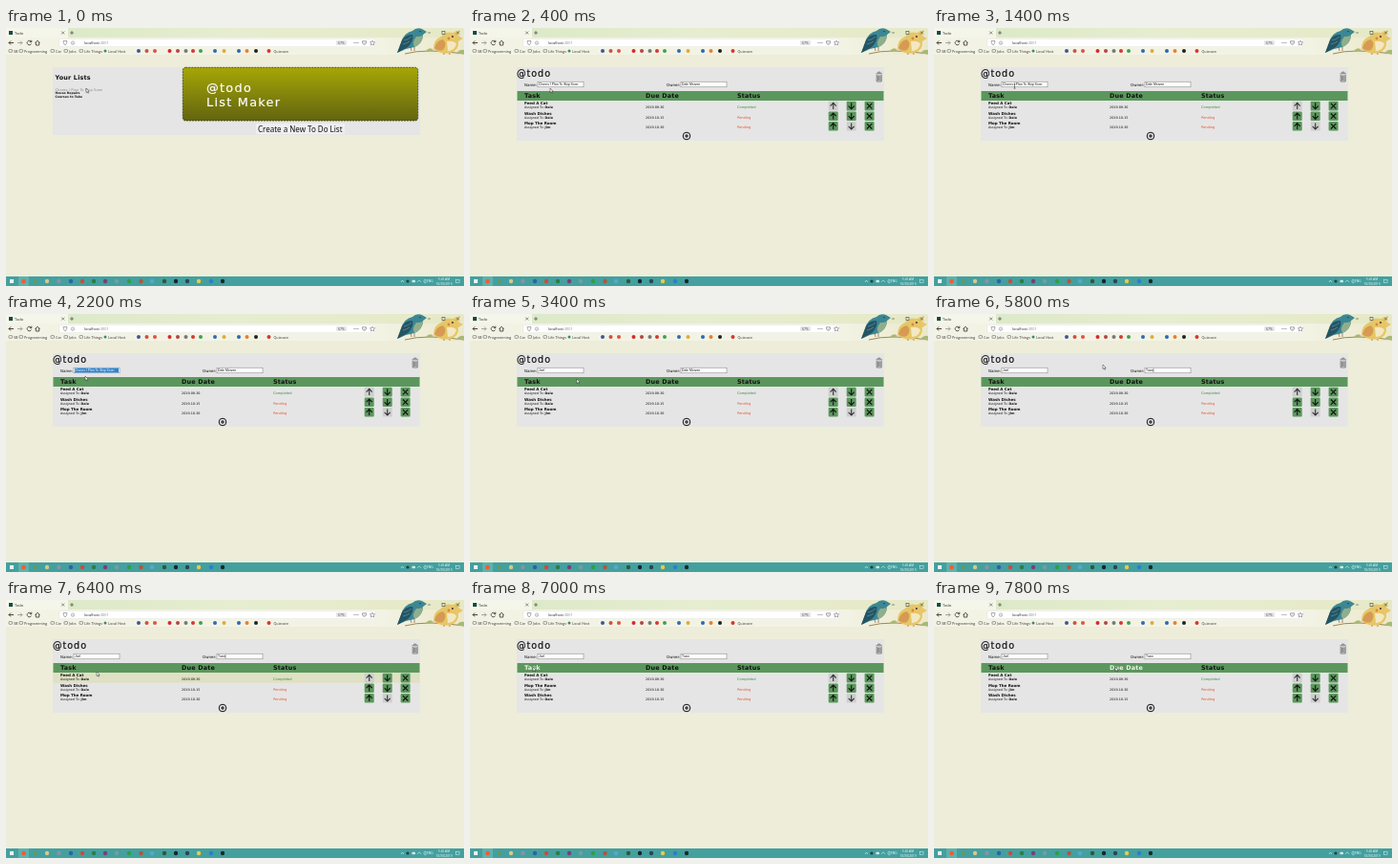
An HTML page for the animation above (8000 ms loop, 480 by 270 pixels).

```html
<!DOCTYPE html>
<html lang="en">
<head>
<meta charset="utf-8">
<title>Todo</title>
<style>
  html, body { margin: 0; width: 100%; height: 100%; overflow: hidden; background: #ededda; }
  svg { display: block; width: 100%; height: 100%; }
  text { font-family: "DejaVu Sans", sans-serif; white-space: pre; }
  .ui { font-family: "Open Sans", sans-serif; }
  .field { font-family: "Liberation Sans", sans-serif; }
  .bold { font-weight: 700; }
  .logo { letter-spacing: .1em; stroke: currentColor; stroke-width: .2; }
</style>
</head>
<body>
<svg id="stage" viewBox="0 0 480 270" preserveAspectRatio="none"></svg>
<script>
const LOOP = 8000, STEP = 200;
const GREEN = '#5b975d', INK = '#111';
const LIST_NAME = 'Chores I Plan To Skip Soon';
const OWNER = 'Dale Morven';
const NEW_NAME = 'Joel', NEW_OWNER = 'Tuan';
const ROW_TOP = 76, ROW_STEP = 10.6;

const tasks = [
  { title: 'Feed A Cat', who: 'Dale', due: '2019-09-30', status: 'Completed' },
  { title: 'Wash Dishes', who: 'Dale', due: '2019-10-15', status: 'Pending' },
  { title: 'Mop The Room', who: 'Jim', due: '2019-10-30', status: 'Pending' },
];

const text = (x, y, size, str, fill = INK, cls = '', extra = '') =>
  `<text x="${x}" y="${y}" font-size="${size}" fill="${fill}" class="${cls}" ${extra}>${str}</text>`;
const rect = (x, y, w, h, fill, extra = '') =>
  `<rect x="${x}" y="${y}" width="${w}" height="${h}" fill="${fill}" ${extra}/>`;
const dot = (x, y, r, fill, extra = '') =>
  `<circle cx="${x}" cy="${y}" r="${r}" fill="${fill}" ${extra}/>`;
const line = (d, width = .8, color = '#333', extra = '') =>
  `<path d="${d}" fill="none" stroke="${color}" stroke-width="${width}" ${extra}/>`;
const shape = (d, fill, extra = '') => `<path d="${d}" fill="${fill}" ${extra}/>`;

function birds() {
  return line('M418 27Q440 21 480 27', 1, '#9a8a5c')
    + shape('M440 24q4-5 8-1q-3 3-8 1M472 27q3-5 8-4v4z', '#a9b878')
    // teal bird, tail at lower left
    + shape('M410 26L414 15Q417 5 426 3Q430-1 436 1L441 4L437 7Q437 16 428 20L419 22Z', '#3c8794')
    + shape('M410 26L415 13Q419 6 426 7Q428 13 421 20Z', '#255463')
    + shape('M430 9Q436 9 437 7Q437 16 428 20Q425 15 430 9Z', '#8fae8c')
    + line('M417 13Q422 12 425 9M416 17Q420 16 423 14', .5, '#7fb0b3')
    + dot(434, 3.6, .7, '#16272b')
    + line('M424 20l1 4M428 20v4', .6, '#6c4630')
    // yellow bird, head at upper right
    + shape('M448 22Q448 12 456 9Q460 3 468 5L476 2L474 8L479 11L474 14Q475 23 466 26Q456 28 448 22Z', '#e6c668')
    + shape('M449 21Q451 13 458 12Q463 17 458 23Q453 25 449 21Z', '#d69a52')
    + shape('M462 14Q470 13 472 17Q470 24 463 24Z', '#f3e8c0')
    + dot(468, 9, .9, '#2b2a20') + dot(464, 11, 1.4, '#dc8943')
    + line('M459 26v2M465 26v2', .6, '#875637');
}

function browser() {
  let out = rect(0, 0, 480, 10, 'url(#strip)')
    + rect(0, 0, 65, 10, '#f5f6ea')
    + rect(3, 3, 4, 4, '#174b45')
    + text(9, 6.5, 4, 'Todo', '#333', 'ui')
    + line('M58.2 3.5l3 3m0-3l-3 3', .6, '#444')
    + line('M69 3v4m-2-2h4', .6)
    + rect(0, 10, 480, 18, '#f3f3e5')
    + rect(390, 10, 90, 18, 'url(#glow)')
    + birds()
    + rect(56, 11.5, 331, 8, '#fff', 'rx="1" stroke="#ddd" stroke-width=".4"')
    + line('M442 5h3M472 3.5l3 3m0-3l-3 3', .6, '#444')
    + rect(457, 3.5, 3, 3, 'none', 'stroke="#444" stroke-width=".6"')
    + line('M8 15.5H3m2-2l-2 2 2 2', .9)
    + line('M12 15.5h5m-2-2l2 2-2 2', .9, '#999')
    + line('M26.5 14.5a2.3 2.3 0 1 0 0 2M26.8 12.7v2h-2', .8)
    + line('M30.5 15.5l2.5-2.3 2.5 2.3M31.3 15v3h3.4v-3', .8)
    + line('M60 13.5h4q0 3-2 4.5q-2-1.5-2-4.5z', .6, '#777')
    + dot(70, 15.6, 1.7, 'none', 'stroke="#777" stroke-width=".5"')
    + line('M70 15.3v1.3', .5, '#777')
    + text(82, 17, 3.8, 'localhost<tspan fill="#888">:3001</tspan>', '#222', 'ui')
    + rect(346, 13, 11, 5, '#e6e6e6', 'rx="1"')
    + text(348, 16.9, 3.4, '67%', '#444', 'ui')
    + [365, 367, 369].map(x => dot(x, 15.5, .5, '#555')).join('')
    + line('M373.5 13.7h4v2q-2 3.5-4 0zM374.4 15l1.1 1 1.1-1', .5, '#555')
    + line('M384 13l.8 1.7 1.8.2-1.3 1.2.4 1.8-1.7-.9-1.7.9.4-1.8-1.3-1.2 1.8-.2z', .5, '#555');

  const folders = [[3, 'SB'], [14, 'Programming'], [47, 'Car'], [61, 'Jobs'], [77, 'Life Things']];
  for (const [x, name] of folders) {
    out += rect(x, 22.6, 3.5, 2.7, 'none', 'rx=".4" stroke="#666" stroke-width=".6"')
      + text(x + 5, 25.5, 3.8, name, '#333', 'ui');
  }
  out += dot(104, 24, 1.5, '#3a8b68') + text(107, 25.5, 3.8, 'Local Host', '#333', 'ui');
  const marks = [[139, '#3b5998'], [147.5, '#d54a3f'], [156, '#e0533a'], [171.5, '#d32929'], [180, '#b8443c'],
    [188.5, '#777'], [196, '#d8382e'], [204, '#3fa053'], [219, '#2f6bb0'], [228.5, '#d8ae35'],
    [244, '#2a6aa8'], [252.5, '#e87e2a'], [262, '#222'], [275.5, '#d9342b']];
  out += marks.map(([x, c]) => dot(x, 24, 2, c)).join('')
    + text(280.5, 25.5, 3.7, 'Quizcave', '#333', 'ui');
  return out;
}

function taskbar() {
  const icons = [[18.5, '#e8602f'], [31, '#5b9c6c'], [43, '#d8c98a'], [55.5, '#8d90a8'], [68, '#2f62a8'],
    [80, '#cf4b34'], [92, '#2f7a4c'], [104, '#7c3c7e'], [116, '#7d9a9c'], [129, '#2aa04a'],
    [141.5, '#b5553d'], [153, '#5aa6d0'], [166, '#2c5a3c'], [178, '#17262b'], [190, '#2a4656'],
    [202, '#ecc94a'], [215, '#2a7fce'], [227, '#20272b']];
  return rect(0, 260, 480, 10, '#43a09f')
    + rect(4, 263, 4, 4, '#e8f4f2')
    + rect(13, 260, 11, 10, '#5fb0ae')
    + icons.map(([x, c]) => dot(x, 265, 2.2, c)).join('')
    + line('M414 266l1.5-2 1.5 2', .6, '#e6f2f1')
    + dot(421, 265, 1.6, '#263c42')
    + rect(425.5, 263.8, 3.4, 2.4, '#d4e8e6')
    + line('M431 266q2-4 4 0M438 264v2l2 1v-4l-2 1', .5, '#e6f2f1')
    + text(441, 266.3, 3.2, 'ENG', '#fff', 'ui')
    + text(459, 264.2, 3.2, '5:26 AM', '#fff', 'ui', 'text-anchor="middle"')
    + text(459, 268.5, 3.2, '10/30/2019', '#fff', 'ui', 'text-anchor="middle"')
    + rect(471.5, 263.6, 3.6, 2.8, 'none', 'stroke="#e6f2f1" stroke-width=".5"');
}

function home() {
  return rect(49, 41, 385, 71, '#e5e5e5')
    + text(51.5, 54.3, 6.4, 'Your Lists', INK, 'bold', 'letter-spacing=".2"')
    + text(51.5, 65.6, 3.6, LIST_NAME, '#888', '', 'letter-spacing=".1"')
    + text(51.5, 69.2, 3.2, 'House Repairs', INK, 'bold')
    + text(51.5, 73, 3.2, 'Courses to Take', INK, 'bold')
    + rect(185.3, 41.3, 246.4, 55.7, 'url(#olive)', 'rx="3" stroke="#353b12" stroke-width=".8" stroke-dasharray="2 1"')
    + text(210, 67, 12.8, '@todo', '#fff', 'logo', 'color="#fff"')
    + text(210, 82, 12.8, 'List Maker', '#fff', 'logo', 'color="#fff"')
    + rect(262, 100, 93, 11, '#efefef')
    + text(264, 108.6, 8, 'Create a New To Do List', INK, '', 'style="font-family:\'Noto Sans\',sans-serif"');
}

function input(x, id) {
  return rect(x, 56.2, 48, 5.6, '#fff', 'stroke="#777" stroke-width=".5"')
    + rect(x + 1, 56.7, 0, 4.6, '#2684d8', `id="${id}Sel"`)
    + text(x + 1, 60.3, 3.4, '', INK, 'field', `id="${id}"`)
    + rect(x, 57, .4, 4, INK, `id="${id}Caret"`);
}

function button(x, y, icon, enabled) {
  const icons = {
    up: 'M0 3.3V-3M-3 0L0-3.2L3 0',
    down: 'M0-3.3V3M-3 0L0 3.2L3 0',
    close: 'M-2.7-2.7L2.7 2.7M2.7-2.7L-2.7 2.7',
  };
  return rect(x - 5, y - 4.8, 10, 9.6, enabled ? GREEN : '#cecece', 'rx="1"')
    + line(icons[icon], 1.1, enabled ? INK : '#333', `transform="translate(${x} ${y})"`);
}

function taskRow(task) {
  const color = task.status === 'Completed' ? '#3d8b4b' : '#f0502e';
  return `<g class="task">`
    + text(57, 4.3, 4, task.title, INK, 'bold')
    + text(57, 8.2, 3.3, `Assigned To: <tspan font-weight="700">${task.who}</tspan>`)
    + text(184, 8.2, 3.35, task.due)
    + text(280, 8.2, 3.6, task.status, color)
    + '</g>';
}

function editor() {
  const buttons = tasks.map((_, i) => {
    const y = 81.6 + i * ROW_STEP;
    return button(380.7, y, 'up', i > 0) + button(399.7, y, 'down', i < 2) + button(418.6, y, 'close', true);
  }).join('');
  return rect(49, 41, 385, 77, '#e5e5e5')
    + text(49, 51, 9.6, '@todo', INK, 'logo', 'color="#111"')
    + line('M425.5 47.8h6.5M427.5 47.2v-1h2.5v1M426.2 49v7h5v-7M427.6 49.5v5.5M428.8 49.5v5.5M430 49.5v5.5', .7, '#555')
    + text(57, 60.6, 4, 'Name:') + input(71, 'name')
    + text(206, 60.6, 4, 'Owner:') + input(221, 'owner')
    + rect(49.5, 66, 384, 10, GREEN)
    + text(57, 73, 6.4, 'Task', INK, 'bold', 'id="taskHead" letter-spacing=".2"')
    + text(184, 73, 6.4, 'Due Date', INK, 'bold', 'id="dueHead" letter-spacing=".2"')
    + text(280, 73, 6.4, 'Status', INK, 'bold', 'letter-spacing=".2"')
    + rect(49.5, 76, 384, ROW_STEP, '#dfe0c4', 'id="hover"')
    + tasks.map(taskRow).join('') + buttons
    + dot(227, 113, 3.8, 'none', 'stroke="#111" stroke-width="1"')
    + line('M227 111v4m-2-2h4', 1, INK);
}

const stage = document.getElementById('stage');
stage.innerHTML = `<defs>
  <linearGradient id="olive" x2="0" y2="1"><stop stop-color="#a6a606"/><stop offset="1" stop-color="#626410"/></linearGradient>
  <linearGradient id="strip"><stop stop-color="#d9e8c6"/><stop offset=".5" stop-color="#e6edd0"/><stop offset="1" stop-color="#e6e9c6"/></linearGradient>
  <linearGradient id="glow"><stop stop-color="#f3f3e5"/><stop offset="1" stop-color="#ebe8c8"/></linearGradient>
  </defs>`
  + rect(0, 0, 480, 270, '#ededda') + browser()
  + `<g id="home">${home()}</g><g id="editor">${editor()}</g>` + taskbar()
  + `<g id="pointer">${shape('M0 0V4.6L1.1 3.6L1.9 5.3L2.6 5L1.8 3.3H3.2Z', '#fff', 'stroke="#222" stroke-width=".45"')}</g>`
  + `<g id="beam">${line('M-1-2.2h2M0-2.2v4.4M-1 2.2h2', .5, '#222')}</g>`;

const el = id => document.getElementById(id);
const show = (id, on) => el(id).setAttribute('visibility', on ? 'visible' : 'hidden');
const rows = [...document.querySelectorAll('.task')];

// time, x, y
const path = [[0, 84, 63], [1200, 84, 63], [1600, 85, 59], [1900, 85, 59], [2200, 83, 65],
  [3200, 83, 65], [3400, 112, 68], [4200, 262, 59], [4600, 177, 53], [6000, 177, 53],
  [6400, 95, 75], [6800, 66, 70], [7200, 66, 70], [7600, 190, 70], [8000, 190, 70]];

function mouseAt(t) {
  const i = path.findIndex(p => p[0] > t);
  const [t0, x0, y0] = path[i - 1], [t1, x1, y1] = path[i];
  const k = (t - t0) / (t1 - t0), e = k * k * (3 - 2 * k);
  return [x0 + (x1 - x0) * e, y0 + (y1 - y0) * e];
}

const typed = (str, from, t) => str.slice(0, Math.max(0, Math.floor((t - from) / STEP) + 1));

function setField(id, x, value, selFrom, selected, focused) {
  const node = el(id), sel = el(id + 'Sel');
  node.textContent = value;
  const width = Math.min(46, node.getComputedTextLength());
  const start = Math.min(width, Math.max(0, selFrom - x - 1));
  sel.setAttribute('x', x + 1 + start);
  sel.setAttribute('width', selected ? 46 - start : 0);
  node.setAttribute('fill', selected && start < width / 2 ? '#fff' : INK);
  el(id + 'Caret').setAttribute('x', x + 1.2 + width);
  show(id + 'Caret', focused && !selected);
}

function draw(t) {
  const [mx, my] = mouseAt(t);
  const editing = t >= 200;
  el('home').style.display = editing ? 'none' : '';
  el('editor').style.display = editing ? '' : 'none';

  const inField = editing && my > 56 && my < 62 && ((mx > 71 && mx < 119) || (mx > 221 && mx < 269));
  show('beam', inField);
  show('pointer', !inField);
  for (const id of ['beam', 'pointer']) el(id).setAttribute('transform', `translate(${mx} ${my})`);
  if (!editing) return;

  setField('name', 71, t < 2600 ? LIST_NAME : typed(NEW_NAME, 2600, t), 0, t >= 1800 && t < 2600, t >= 2600 && t < 3400);
  setField('owner', 221, t < 5000 ? OWNER : typed(NEW_OWNER, 5000, t), mx, t >= 4200 && t < 5000, t >= 5000 && t < 6800);

  const inHead = my > 66 && my < 75;
  el('taskHead').setAttribute('fill', inHead && mx > 57 && mx < 75 ? '#eef3e8' : INK);
  el('dueHead').setAttribute('fill', inHead && mx > 184 && mx < 220 ? '#eef3e8' : INK);
  show('hover', my >= 75);

  const order = t < 7000 ? [0, 1, 2] : [0, 2, 1];
  rows.forEach((row, i) => row.setAttribute('transform', `translate(0 ${ROW_TOP + order[i] * ROW_STEP})`));
}

const begin = performance.now();
function tick() {
  const t = (performance.now() - begin) % LOOP;
  draw(Math.floor(t / STEP) * STEP);
  requestAnimationFrame(tick);
}
tick();
</script>
</body>
</html>
```
